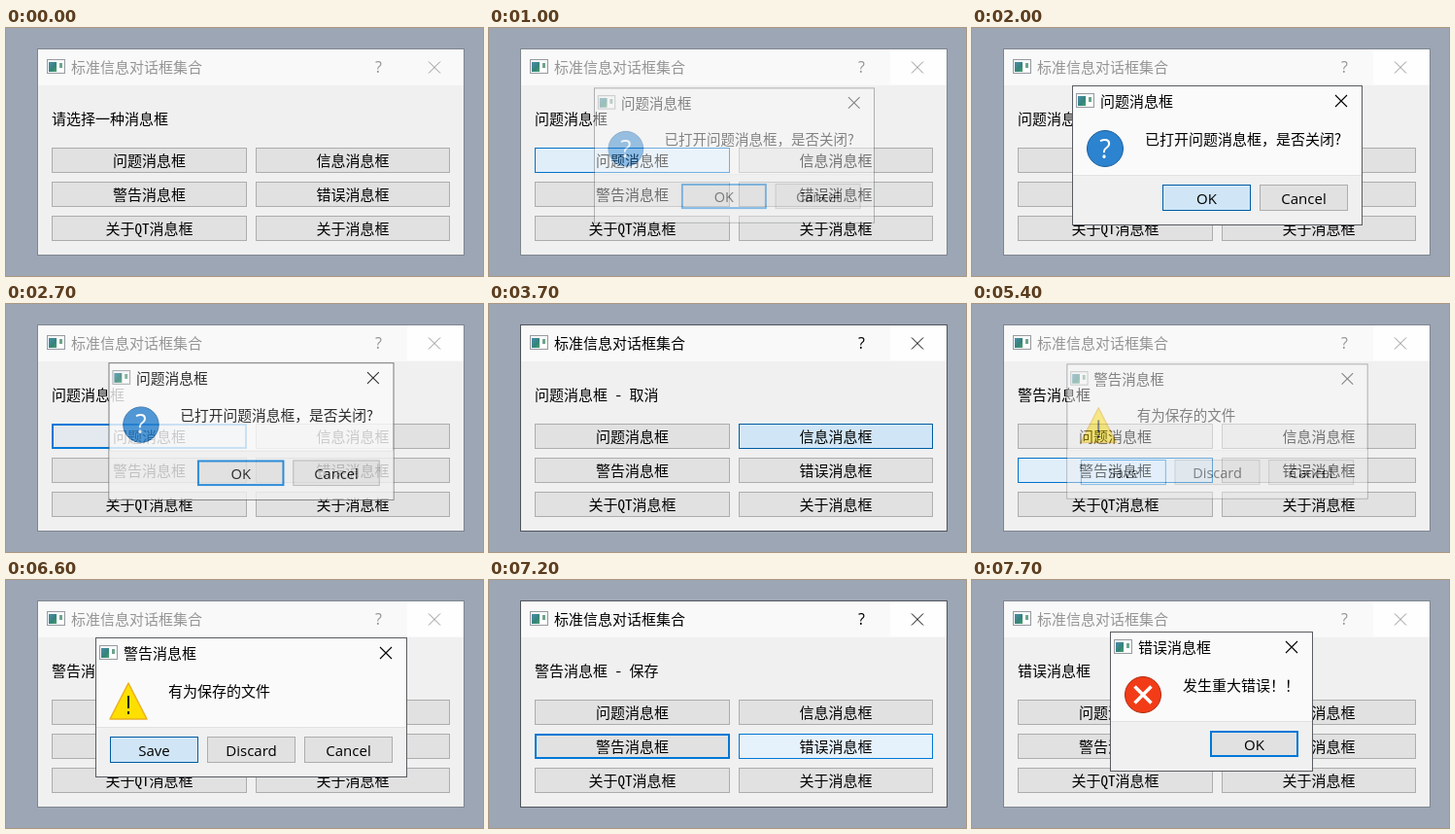
Animation, 491 px wide and 255 px high, one loop 8000 ms. Source, as an HTML page:

```html
<!DOCTYPE html>
<html lang="zh-CN">
<head>
<meta charset="utf-8">
<title>标准信息对话框集合</title>
<style>
  html, body { margin: 0; width: 100%; height: 100%; overflow: hidden; background: #9ca6b5; }
  svg { display: block; width: 491px; height: 255px; }
  text { font: 15px "Noto Sans CJK SC", "Noto Sans CJK", sans-serif; }
  .song { font-family: "Noto Sans Mono CJK SC", "Noto Sans CJK SC", monospace; font-weight: 300; }
  .ui { font-family: "Open Sans", "Noto Sans", sans-serif; }
</style>
</head>
<body>
<svg id="stage" viewBox="0 0 491 255"></svg>
<script>
const LOOP = 8000, STEP = 100;
const stage = document.getElementById('stage');

const names = ['问题消息框', '信息消息框', '警告消息框', '错误消息框', '关于QT消息框', '关于消息框'];

const wide = { x: 92, y: 59, w: 321 }, medium = { x: 103, y: 59, w: 299 }, small = { x: 142, y: 53, w: 209 };
const kinds = [
  { ...medium, icon: 'question', title: names[0], text: '已打开问题消息框，是否关闭?', keys: ['OK', 'Cancel'] },
  { ...small, icon: 'info', title: '信息提示框', text: '这是个信息提示框', keys: ['OK'] },
  { ...wide, icon: 'warning', title: names[2], text: '有为保存的文件', keys: ['Save', 'Discard', 'Cancel'] },
  { ...small, icon: 'error', title: names[3], text: '发生重大错误！！', keys: ['OK'] }
];

// Each visit: hover and press a main button, then hover and press a dialog key.
// "under" is the main button that lies beneath the pointer once the dialog is gone.
const visits = [
  { kind: 0, hover: 600, press: 900, key: 'OK', keyHover: 1400, keyPress: 2000, result: ' - 确定', under: 2 },
  { kind: 0, hover: 2400, press: 2500, key: 'Cancel', keyHover: 2900, keyPress: 3100, result: ' - 取消', under: 3 },
  { kind: 1, hover: 3600, press: 3700, key: 'OK', keyHover: 4200, keyPress: 4400, result: '', under: 3 },
  { kind: 2, hover: 4900, press: 5300, key: 'Save', keyHover: 5200, keyPress: 6600, result: ' - 保存', under: 2 },
  { kind: 3, hover: 7100, press: 7400, keyHover: LOOP, keyPress: LOOP, result: '' }
];
visits.forEach((v, i) => {
  v.open = v.press + STEP;
  v.close = v.keyPress + STEP;
  v.leave = i + 1 < visits.length ? visits[i + 1].hover : LOOP;
});

const clamp = v => Math.max(0, Math.min(1, v));
// Progress that has already taken its first step at the start time.
const ramp = (t, start, span) => clamp((t - start + STEP) / span);
const latest = (t, event) => visits.filter(v => v[event] <= t).pop();

// Button level: 0 idle, 1 hovered, 2 pressed.
function mainLevel(i, t) {
  let level = 0;
  for (const v of visits) {
    if (v.under === i) level += ramp(t, v.close + STEP, 200) - ramp(t, v.leave, 200);
    if (v.kind === i && t < v.press) level += ramp(t, v.hover, 200);
    if (v.kind === i && t >= v.press) level += Math.max(0, 2 - .0075 * (t - v.press));
  }
  return Math.min(2, level);
}
const keyLevel = (v, t) => t >= v.keyPress ? 2 : ramp(t, v.keyHover, 300);

const fills = [[225, 225, 225], [229, 241, 251], [208, 230, 247]];
const edges = [[173, 173, 173], [0, 120, 215], [0, 92, 164]];
function mix(colors, level) {
  const i = level < 1 ? 0 : 1;
  return `rgb(${colors[i].map((c, n) => Math.round(c + (colors[i + 1][n] - c) * (level - i)))})`;
}

const rect = (x, y, w, h, fill) =>
  `<rect x="${x}" y="${y}" width="${w}" height="${h}" fill="${fill}"/>`;
const frame = (x, y, w, h, fill, edge, line = 1) =>
  rect(x, y, w, h, edge) + rect(x + line, y + line, w - 2 * line, h - 2 * line, fill);
const text = (x, y, s, color = '#000', cls = '', anchor = 'start', size = 15) =>
  `<text x="${x}" y="${y}" fill="${color}" class="${cls}" text-anchor="${anchor}" style="font-size:${size}px">${s}</text>`;
const cross = (x, y, r, color, line) =>
  `<path d="M${x - r} ${y - r}l${2 * r} ${2 * r}m0 ${-2 * r}l${-2 * r} ${2 * r}" stroke="${color}" stroke-width="${line}" fill="none"/>`;
const disc = (x, y, fill, edge) =>
  `<circle cx="${x}" cy="${y}" r="18.5" fill="${fill}" stroke="${edge}"/>`;

function button(x, y, w, h, s, level, focused, cls) {
  const ring = focused && level < 1;
  const edge = ring ? '#0078d7' : mix(edges, level);
  return frame(x, y, w, h, mix(fills, level), edge, ring ? 2 : 1) +
    text(x + w / 2, y + (cls === 'ui' ? 20 : 19), s, '#000', cls, 'middle');
}

const windowIcon = (x, y) =>
  frame(x, y, 19, 15, '#f6f7f8', '#979ca1') +
  rect(x + 2, y + 3, 8, 10, 'url(#pane)') +
  rect(x + 11, y + 3, 6, 10, '#fff') + rect(x + 13, y + 4, 3, 5, '#6da58c');

const icons = {
  question: (x, y) => disc(x, y, '#2c83cf', '#1b5f9f') +
    text(x, y + 9.5, '?', '#fff', 'ui', 'middle', 27),
  info: (x, y) => disc(x, y, '#2c83cf', '#1b5f9f') +
    rect(x - 1.5, y - 10, 3, 3.5, '#fff') + rect(x - 1.5, y - 4, 3, 14, '#fff'),
  warning: (x, y) =>
    `<path d="M${x} ${y - 18}l19 37h-38Z" fill="#ffdf00" stroke="#eab021" stroke-width="1.5" stroke-linejoin="round"/>` +
    rect(x - 1, y - 5, 2, 13, '#111') + rect(x - 1, y + 11, 2, 3, '#111'),
  error: (x, y) => disc(x, y, '#f23c17', '#ae2c12') + cross(x, y, 8.5, '#fff', 3.4)
};

function mainWindow(t) {
  const pressed = latest(t, 'press'), opened = latest(t, 'open');
  const on = pressed && (t < pressed.open || t >= pressed.close);
  const ink = on ? '#000' : '#959595';
  const label = opened ? names[opened.kind] + (t >= opened.close ? opened.result : '') : '请选择一种消息框';
  const buttons = names.map((name, i) => {
    const column = i % 2, level = mainLevel(i, t);
    const focused = pressed && pressed.kind === i && (on || level > 0);
    return button(47 + 210 * column, 123 + 35 * (i >> 1), 201 - column, 26, name, level, focused, 'song');
  });
  return frame(32, 21, 440, 213, '#f0f0f0', on ? '#50555c' : '#7f868f') +
    rect(33, 22, 438, 37, '#f9f9f9') +
    `<g opacity="${clamp(t / 200)}">${rect(413, 22, 58, 36, '#fefefe')}</g>` +
    windowIcon(42, 32) + text(67, 46, '标准信息对话框集合', ink) +
    text(383.5, 46, '?', ink, 'ui', 'middle', 16) + cross(441, 40.5, 6, ink, 1) +
    text(47, 99, label, '#000', 'song') + buttons.join('');
}

function dialog(v, t) {
  const shown = ramp(t, v.open, 300), gone = ramp(t, v.close, 300);
  if (t < v.open || gone === 1) return '';
  const closing = t >= v.close;
  const alpha = closing ? (1 - gone) ** 2.5 : 1 - (1 - shown) ** 1.5;
  const scale = closing ? 1 - .1 * gone : .95 + .05 * shown;
  const { x, y, w, icon, title, text: message, keys } = kinds[v.kind];
  const h = 144, cx = x + w / 2, cy = y + h / 2;
  const row = keys.map((name, i) => button(x + w - 6 - 100 * (keys.length - i), y + 102, 91, 27,
    name, name === v.key ? keyLevel(v, t) : 0, i === 0, 'ui'));
  return `<g opacity="${alpha}" transform="translate(${cx} ${cy}) scale(${scale}) translate(${-cx} ${-cy})">` +
    frame(x, y, w, h, '#fafafa', '#595c60') +
    rect(x + 1, y + 92, w - 2, h - 93, '#f0f0f0') + rect(x + 1, y + 92, w - 2, 1, '#e2e2e2') +
    windowIcon(x + 4, y + 8) + text(x + 29, y + 22, title) +
    cross(x + w - 22, y + 16, 6, '#000', 1.1) +
    icons[icon](x + 34, y + 65) + text(x + 75, y + 61, message) + row.join('') + '</g>';
}

const defs = `<defs><linearGradient id="pane" x2="1" y2="1">
  <stop offset="0" stop-color="#4a8dac"/><stop offset=".6" stop-color="#35837a"/>
  <stop offset="1" stop-color="#47a266"/></linearGradient></defs>`;

function draw(t) {
  stage.innerHTML = defs + rect(0, 0, 491, 255, '#9ca6b5') + mainWindow(t) +
    visits.map(v => dialog(v, t)).join('');
}

let shownTime = -1;
const begin = performance.now();
function tick() {
  const t = Math.floor((performance.now() - begin) % LOOP / STEP) * STEP;
  if (t !== shownTime) draw(shownTime = t);
  requestAnimationFrame(tick);
}
tick();
</script>
</body>
</html>
```
